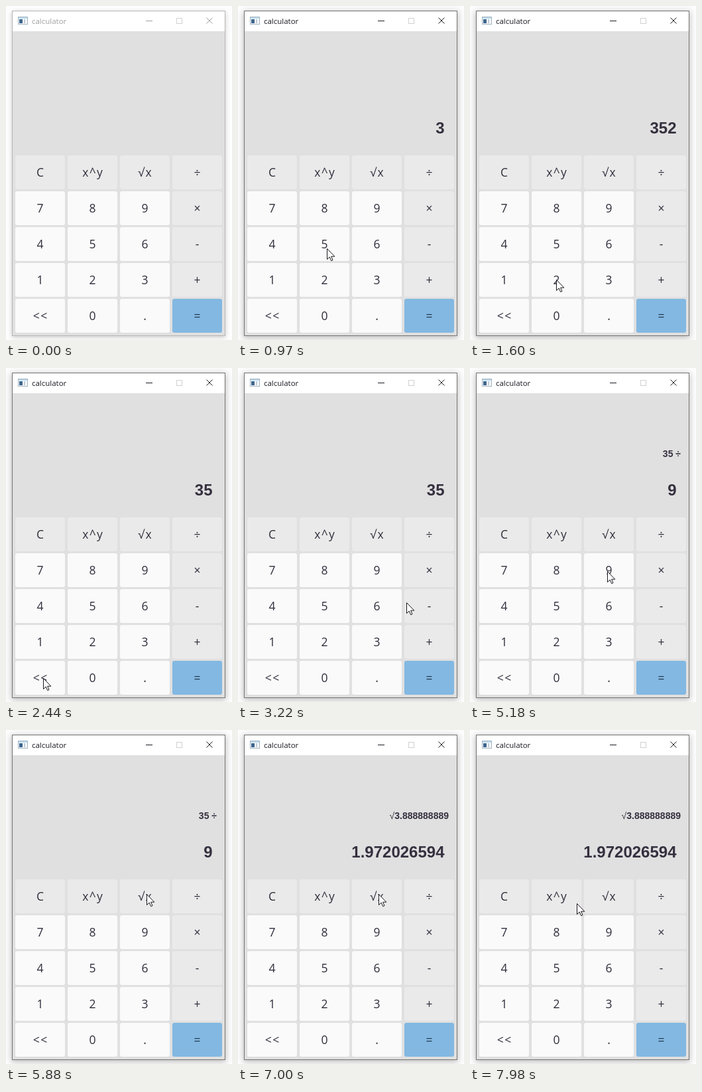
These frames come from a looping animation (341 px wide and 503 px high, 8 s). An HTML page:

```html
<!DOCTYPE html>
<html lang="en">
<head>
<meta charset="utf-8">
<title>calculator</title>
<style>
html, body { margin: 0; width: 100%; height: 100%; overflow: hidden; background: #fdfdfd; }
body { position: relative; }
#win {
  position: absolute; left: 9px; top: 7px; width: 320px; height: 488px;
  border: 1px solid #b8b5b3; background: #e0e0e0; color: #a0a0a0;
  box-shadow: 0 2px 7px rgba(0, 0, 0, .2);
}
#win.active { border-color: #777472; color: #1c1a22; box-shadow: 0 2px 9px 1px rgba(0, 0, 0, .25); }
#bar { position: absolute; left: 0; top: 0; width: 320px; height: 30px; background: #fff; }
#bar svg { position: absolute; left: 0; top: 0; }
#bar span { position: absolute; left: 29px; font: 11.5px/30px "Open Sans", "Noto Sans", sans-serif; }
.key {
  position: absolute; width: 75px; height: 51px; border-radius: 3px; background: #fafafa;
  box-sizing: border-box; padding-left: 1.5px; text-align: center; color: #302f3d;
  font: 17.5px/51px "Open Sans", "Noto Sans", sans-serif; letter-spacing: 1.5px;
}
.op { background: #eaeaea; }
.eq { background: #82b8e2; color: #24384c; }
.out {
  position: absolute; white-space: pre; color: #35303f;
  font-family: "Liberation Sans", Arial, sans-serif; font-weight: bold;
}
#expr { right: 23px; top: 121px; font-size: 14px; line-height: 16px; }
#num { right: 29.5px; top: 170px; font-size: 24px; line-height: 28px; }
#expr i { font-style: normal; font-weight: normal; }
#cursor { position: absolute; left: 0; top: 0; overflow: visible; }
</style>
</head>
<body>
<div id="win">
  <div id="bar">
    <svg width="320" height="30" fill="none" stroke="currentColor">
      <g stroke="none">
        <rect x="8" y="8" width="15" height="12" fill="#a3b4c0"/>
        <rect x="9" y="9" width="13" height="2" fill="#b9dcf0"/>
        <rect x="9" y="11" width="13" height="8" fill="#f4f7f9"/>
        <rect x="10" y="12" width="5" height="6" fill="#3d668f"/>
        <rect x="17" y="12" width="2" height="6" fill="#c3ccd4"/>
      </g>
      <path d="M201 14.5h10M292.5 9.5l9 9m0-9l-9 9"/>
      <rect x="247.5" y="10.5" width="8" height="8" stroke="#d2d2d2"/>
    </svg>
    <span>calculator</span>
  </div>
</div>
<div class="out" id="expr"></div>
<div class="out" id="num"></div>
<svg id="cursor" width="14" height="21">
  <path d="M.5 .5V16.5L4.2 13L6.7 18.6L9 17.6L6.6 12.2H11.8Z" fill="#fff" stroke="#1a161c"/>
</svg>
<script>
const $ = id => document.getElementById(id);
const LOOP = 8000, ACTIVATE = 550;

"C x^y √x ÷ 7 8 9 × 4 5 6 - 1 2 3 + << 0 . =".split(" ").forEach((label, i) => {
  const col = i % 4, row = i >> 2, key = document.createElement("div");
  key.className = "key" + (label === "=" ? " eq" : row === 0 || col === 3 ? " op" : "");
  key.style.left = 14 + col * 79 + "px";
  key.style.top = 225 + row * 54 + "px";
  key.textContent = label;
  document.body.insertBefore(key, $("expr"));
});

// Pointer moves: start, end, x, y, then the key pressed there and when
const START = [345, 470];
const moves = [
  [140, 480, 211, 414, "3", 620],
  [690, 970, 134, 365, "5", 1180],
  [1250, 1530, 130, 412, "2", 1600],
  [1740, 2020, 62, 486],
  [2160, 2370, 56, 467, "<<", 2300],
  [2860, 3210, 253, 354],
  [3210, 3400, 313, 292],
  [3400, 3570, 282, 260, "÷", 4200],
  [4480, 4900, 207, 306, "9", 5100],
  [5530, 5870, 212, 247, "√x", 6580],
  [7480, 7970, 161, 261]
];

function pointerAt(t) {
  let [x, y] = START;
  for (const [t0, t1, x1, y1] of moves) {
    const u = Math.min(Math.max((t - t0) / (t1 - t0), 0), 1), e = u * u * (3 - 2 * u);
    x += (x1 - x) * e;
    y += (y1 - y) * e;
  }
  return [Math.round(x), Math.round(y)];
}

const tidy = v => String(+v.toPrecision(10));

function displayAt(t) {
  let expr = "", num = "", left = 1, dividing = false;
  for (const [, , , , key, when] of moves) {
    if (!key || when > t) continue;
    if (key === "<<") num = num.slice(0, -1);
    else if (key === "÷") {
      left = +num;
      dividing = true;
      expr = num + " ÷";
      num = "";
    } else if (key === "√x") {
      const value = dividing ? left / num : +num;
      expr = "<i>√</i>" + tidy(value);
      num = tidy(Math.sqrt(value));
    } else num += key;
  }
  return [expr, num];
}

function draw() {
  const t = performance.now() % LOOP;
  const [x, y] = pointerAt(t), [expr, num] = displayAt(t);
  $("cursor").style.transform = `translate(${x}px, ${y}px)`;
  $("win").classList.toggle("active", t >= ACTIVATE);
  $("expr").innerHTML = expr;
  $("num").textContent = num;
  requestAnimationFrame(draw);
}
draw();
</script>
</body>
</html>
```
